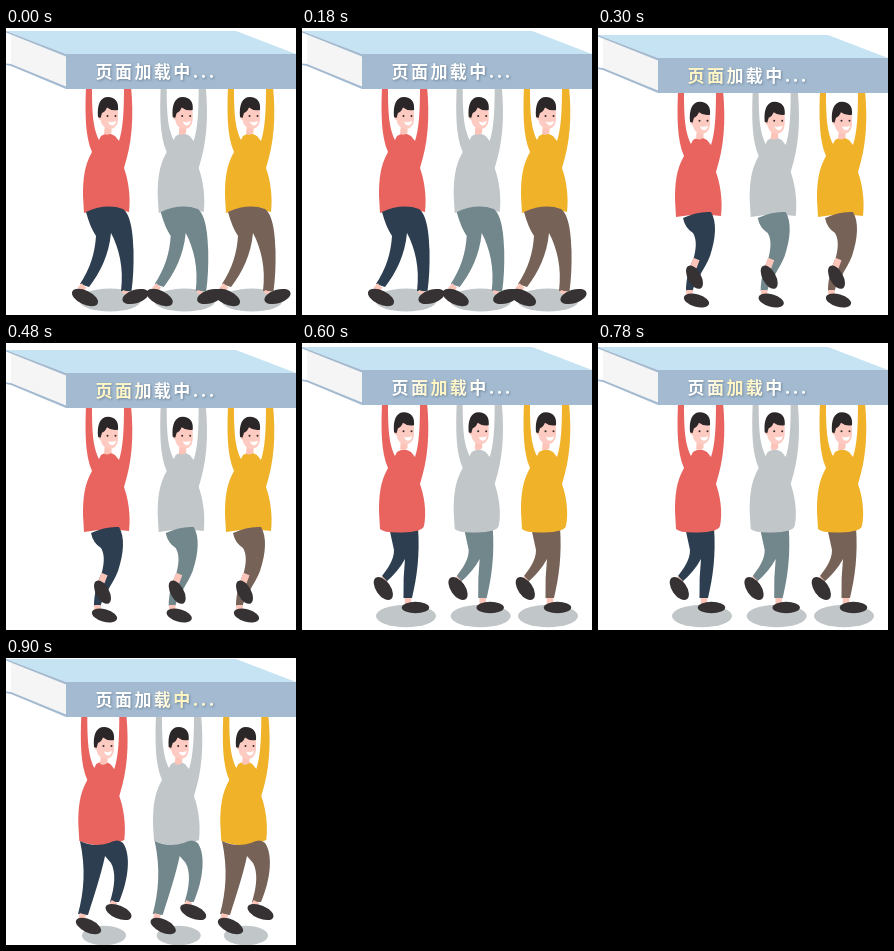
Write an HTML page that moves like this. It is 290 px wide and 287 px high and loops after 1200 ms.

```html
<!DOCTYPE html>
<html lang="zh">
<head>
<meta charset="utf-8">
<title>页面加载中</title>
<style>
html, body { margin: 0; width: 100%; height: 100%; overflow: hidden; background: #fff; }
svg { display: block; width: 290px; height: 287px; }
text {
  font: bold 17px "Noto Sans CJK SC", "Noto Sans CJK", "Noto Sans CJK JP", sans-serif;
  letter-spacing: 2.45px;
  filter: drop-shadow(1px 1px 1px rgba(70, 90, 110, .5));
}
</style>
</head>
<body>
<svg id="stage" viewBox="0 0 290 287">
  <defs>
    <linearGradient id="shine" gradientUnits="userSpaceOnUse" y1="0" y2="0">
      <stop offset="0" stop-color="#fff"/>
      <stop offset=".35" stop-color="#fff6c4"/>
      <stop offset=".65" stop-color="#fff6c4"/>
      <stop offset="1" stop-color="#fff"/>
    </linearGradient>
    <g id="head">
      <path d="M99 96H105.500V105Q102 108 98 106Z" fill="#fcc3b8"/>
      <path d="M93 82Q94 77 103 77Q112 77 112 84V92Q111 101 103 101Q96 100 94.500 92Q91.500 91 92 87Z" fill="#fdcbc1"/>
      <path d="M92 89C91 77 94 69 102 69C109 69 113 74 112 82Q105 83 101 79.500Q99 84 96 85L94.500 90Z" fill="#2b2728"/>
      <circle cx="101.500" cy="88" r="1" fill="#352b2b"/>
      <circle cx="109.500" cy="88" r="1" fill="#352b2b"/>
      <path d="M102 93.500Q106 95 110 93Q109 97.500 106 97.500Q103 97 102 93.500Z" fill="#fff"/>
    </g>
  </defs>
  <g id="people"></g>
  <g id="book">
    <path d="M5 5L60 27V59L5 37Z" fill="#f5f5f5"/>
    <path d="M0 3H230L290 26H60Z" fill="#c5e3f3"/>
    <path d="M0 3L60 26H290V61H60L5 38L0 37V35.500L5 36L60 58.500V28.500L0 4.500Z" fill="#a3bad0"/>
    <text x="89.500" y="49.500" fill="url(#shine)">页面加载中...</text>
  </g>
</svg>
<script>
const STEP = 300;
const SKIN = '#fbc5b9';
const people = [
  { x: 0, shirt: '#e9645f', pants: '#2c3e50' },
  { x: 74.7, shirt: '#c1c6c9', pants: '#72878c' },
  { x: 142, shirt: '#f0b228', pants: '#766257' }
];

// Arms and sides of the shirt, closed by each pose's hem
const torso = 'M80 58C79 85 79 108 86 124C78 138 77 152 77 168L78 185';
const arms = 'C125 168 122 151 118 140C126 115 128 90 125 58H118C118 84 117 101 113 113' +
  'L109 108Q102 103 95 108L93 112C87 100 86 85 86 58Z';

// shoe: [cx, cy, rx, ry, angle]; ankle: line path
const poses = [
  {
    book: 0, shine: -100, body: [0, 0], head: [0, 0], shadow: [104, 272, 31, 11.5],
    hem: 'Q102 178 123 184',
    legs: 'M80 184Q100 175 117 181C125 187 127 205 127.500 222Q128 245 125.500 263H115' +
      'C118 240 113 220 105 205C103 227 94 245 83 259L74 256C84 241 89 225 90 208Q84 199 80 184Z',
    ankles: 'M78 257.500L74 262M120 263L119 266',
    shoes: [[79, 269.5, 14, 7, 25], [129.5, 268.5, 13.5, 6.8, -17]]
  },
  {
    book: 4, shine: 106, body: [0, 4], head: [0, 4.7],
    hem: 'Q100 181 123 184',
    legs: 'M85 190Q100 183 113 184C119 194 118 210 112 228C107 241 98 251 94.500 263H88' +
      'C88 251 91 240 96 229C99 217 98 210 95 205Q87 200 85 190Z',
    ankles: 'M98.500 231L95.500 239M91.500 262V268',
    shoes: [[96.5, 249.2, 6.6, 12.8, -29], [98.5, 272.5, 13, 6.2, 16]]
  },
  {
    book: 1, shine: 140, body: [0, 1], head: [0, .2], shadow: [104, 273, 30, 11.2],
    hem: 'Q82 189 100 188.500Q120 188 122 182', shirtOver: true,
    legs: 'M87 184H116C118 212 115 234 110 255H101.500Q101 235 103 216C98 225 92 232 84 239L80 233' +
      'C86 225 92 217 92 207Z',
    ankles: 'M82.500 235.500L79 239M106 255V261',
    shoes: [[81.3, 245.5, 7.2, 13.2, -35], [113.5, 264.5, 13.7, 5.7, 0]]
  },
  {
    book: -2, shine: 181, body: [-4.7, -2], head: [-4, 0], shadow: [98, 277.5, 22, 9.7],
    hem: 'Q101 194 123 184',
    legs: 'M74 183Q88 190 103 185Q112 180 117 185C125 196 123 221 113 244H104' +
      'C109 228 110 214 105 205L99 198C95 217 88 238 82 257L72 256C78 234 80 211 74 183Z',
    ankles: 'M77 256L75 263M108.500 243.500L106 248',
    shoes: [[82.5, 268, 13.6, 6.5, 25], [112.5, 254, 13.8, 6.5, 23]]
  }
];

const oval = ([x, y, rx, ry, turn = 0], fill) =>
  `<ellipse cx="${x}" cy="${y}" rx="${rx}" ry="${ry}" fill="${fill}" transform="rotate(${turn} ${x} ${y})"/>`;

function drawPerson(pose, who) {
  const shirt = `<path d="${torso}${pose.hem}${arms}" fill="${who.shirt}" transform="translate(${pose.body})"/>`;
  const legs = `<path d="${pose.legs}" fill="${who.pants}"/>` +
    `<path d="${pose.ankles}" stroke="${SKIN}" stroke-width="6.5"/>` +
    pose.shoes.map(s => oval(s, '#363233')).join('');
  return `<g transform="translate(${who.x})">` +
    (pose.shadow ? oval(pose.shadow, '#c1c6c8') : '') +
    (pose.shirtOver ? legs + shirt : shirt + legs) +
    `<use href="#head" transform="translate(${pose.head})"/></g>`;
}

const byId = id => document.getElementById(id);
byId('people').innerHTML = poses.map(pose =>
  `<g>${people.map(who => drawPerson(pose, who)).join('')}</g>`).join('');
const groups = [...byId('people').children];

function show(index) {
  const { book, shine } = poses[index];
  groups.forEach((g, i) => g.setAttribute('display', i === index ? 'inline' : 'none'));
  byId('book').setAttribute('transform', `translate(0 ${book})`);
  byId('shine').setAttribute('x1', shine - 38);
  byId('shine').setAttribute('x2', shine + 38);
}

const start = performance.now();
let current = -1;
function tick() {
  const index = Math.floor((performance.now() - start) / STEP) % poses.length;
  if (index !== current) show(current = index);
  requestAnimationFrame(tick);
}
tick();
</script>
</body>
</html>
```
